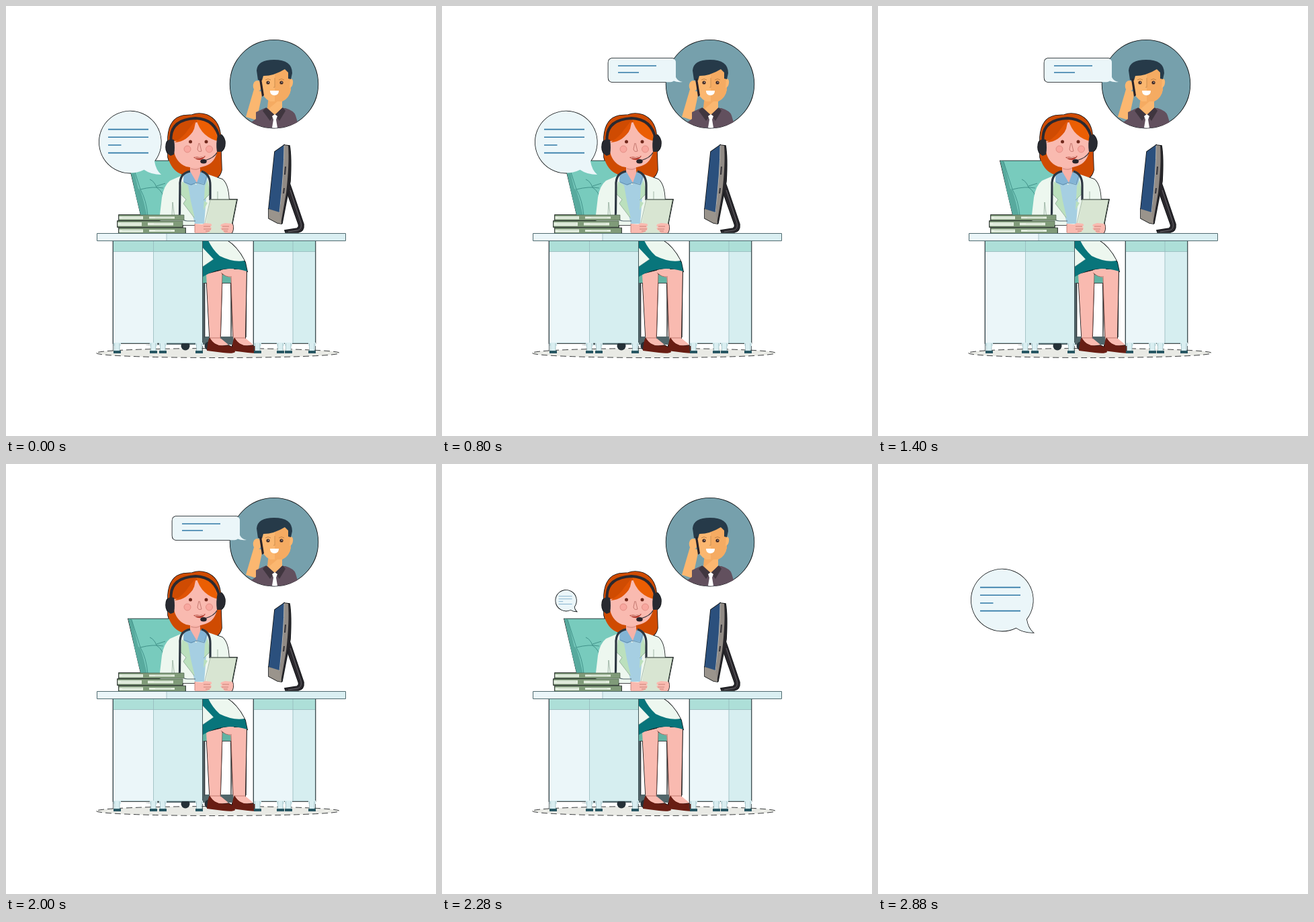
These frames come from a looping animation (640 by 640 pixels, 2.92 s). An HTML page with a canvas:

```html
<!DOCTYPE html>
<html lang="en">
<head>
<meta charset="utf-8">
<title>Support desk</title>
<style>
html, body { margin: 0; width: 100%; height: 100%; overflow: hidden; background: #fff; }
canvas { display: block; width: 100vw; height: 100vh; }
</style>
</head>
<body>
<canvas id="stage" width="640" height="640"></canvas>
<script>
const ctx = document.getElementById('stage').getContext('2d');
const LOOP = 2920, INK = '#0c0f11', ICE = '#ebf6f9', LINE = '#2f78a6';
const parts = [];

// Rimmed shapes get a dark edge that only shows against empty background.
function add(path, fill, rim = false) {
  parts.push({ path: new Path2D(path), fill, rim });
}
function line(path, stroke, width = 1, dash = []) {
  parts.push({ path: new Path2D(path), stroke, width, dash });
}
const box = (x, y, w, h) => `M${x} ${y}h${w}v${h}h${-w}z`;
const oval = (x, y, rx, ry = rx) =>
  `M${x - rx} ${y}a${rx} ${ry} 0 1 0 ${2 * rx} 0a${rx} ${ry} 0 1 0 ${-2 * rx} 0z`;

function buildCaller() {
  const light = '#fbb770', shade = '#f5ab62';
  add(oval(399, 116.3, 65.4), '#76a0ac', true);
  add('M369 124L382 128L373 170L357 165Z', light);
  add('M372 158L385 152H416Q429 156 431 163L434 173Q418 181.7 399 181.7Q380 181.7 365 173L372 168Z', '#62505e');
  add('M391 133H411V151L400 163L389 152Z', shade);
  add('M391 153L411 136V151L400 163Z', light);
  add('M387 151L400 162L393 171L382 156Z', '#40363f');
  add('M412 151L400 162L407 171L416 156Z', '#40363f');
  add('M396 164L400 161L404 164L402 169L404 181Q400 182 396 181L398 169Z', '#fff');
  add('M380 99Q381 92 400 92Q424 93 424 104V124Q422 137 411 142H393Q382 137 380 124Z', light);
  add('M400 94Q424 92 424 106V124Q422 137 411 142H400Z', shade);
  add('M423 108Q428 108 427 115Q426 121 422 122Z', light);
  add('M375 110L373 96Q374 80 399 80Q426 80 426 100L424 109L420 108V99L415 94Q399 104 383 104L381 111Z', '#263a49');
  add(oval(374, 119, 6.3, 8), light);
  add('M377 109L380 108L384 133L381 135Z', '#29242b');
  for (const x of [390, 410]) {
    add(oval(x, 114, 2.6), '#452f2b');
    add(box(x, 113, 1, 1), '#fff');
  }
  line('M386 110Q390 107 394 110M406 110Q410 107 414 110', '#b7793f', .8);
  line('M400 107V121H398', '#c5894d', .8);
  add('M393 126H406Q406 133 399.5 133Q393 133 393 126Z', '#fff');
}

function buildChair() {
  add('M182 230.5H258L272 312H201Z', '#78cbbd', true);
  add('M182 230.5L187 231L207 313H201L193 281Z', '#58aa9e');
  add('M199 273Q204 284 210 313H201L190 268Z', '#58aa9e');
  line('M187 232L200 273Q219 268 234 271M214 258Q221 261 224 270Q234 276 237 292M200 273Q209 289 211 312M224 268L237 264', '#3c8c84', .9);
  add('M293 400H337V412H293Z', '#60b3a3', true);
  add(box(293, 412, 2.5, 91), '#526368', true);
  line('M335 412V492M358 395L357 493', INK, 1.2);
  add('M206 505L238 502H293L296 492H339L343 504H239Z', '#51666a');
  for (const x of [267, 302]) add(oval(x, 506, 6.5), '#253138');
}

function buildLegs() {
  add('M298 399L322 393L319 496L326 505L304 505L303 492Z', '#f9bab0', true);
  add('M334 392H358L356 496L364 505L340 505L338 492Z', '#f9bab0', true);
  add('M320 393L340 389L336 404Q325 403 320 396Z', '#f9bab0');
  line('M320 397Q327 404 336 403M322 398L319 494M335 404L338 494', '#8b5750', .7);
  for (const x of [0, 37]) {
    add(`M${303 + x} 493Q${300 + x} 499 ${299 + x} 513L${323 + x} 516Q${338 + x} 518 ${341 + x} 515Q${341 + x} 509 ${331 + x} 505Q${311 + x} 508 ${303 + x} 493Z`, '#681d13', true);
    add(`M${304 + x} 494Q${316 + x} 495 ${320 + x} 495L${331 + x} 504Q${311 + x} 509 ${304 + x} 494Z`, '#f9bab0');
    line(`M${304 + x} 494H${319 + x}`, '#ad6257', .7);
  }
  add('M293 350H318L356 381L359 395Q323 384 293 403Z', '#08757b', true);
  add('M301 349H329Q344 358 355 379Q338 382 318 372Q307 362 301 349Z', '#edf7ef', true);
  add('M293 360L309 377L293 388Z', '#edf7ef');
  line('M309 377L293 388', '#3c7979', .7);
}

function buildWoman() {
  add('M241 225L241 195Q243 167 264 163L277 162Q287 158 299 162Q316 169 319 190L321 244Q318 258 305 257L260 250Q246 244 241 225Z', '#cf4b02', true);
  add('M274 236H289V252L300 267H264L274 251Z', '#f7b2a8');
  line('M275 242Q284 245 289 241', '#bb7168', .7);
  add('M267 250L244 260Q235 267 232 285L228 319L247 326H322L332 294Q332 266 322 258L299 250L291 263H271Z', '#edf7ef', true);
  add('M264 253L283 266L300 251L299 271L295 324H281L273 290L264 260Z', '#a6cfe2');
  add('M265 249L274 246L284 263L276 267L264 262Z', '#83b4d5');
  add('M290 246L299 252L296 265L284 263Z', '#83b4d5');
  line('M265 262L275 266L284 263L295 266L299 253M284 263V265', '#537f9c', .7);
  add('M262 261L271 267L275 290L281 316L264 294L268 288L260 280Z', '#bbe0bd');
  add('M300 259L304 279L294 290L300 293L294 304L296 268Z', '#bbe0bd');
  line('M260 280L268 288L264 294L280 315M304 279L294 289M248 292L247 312M248 292L251 316M315 276V291', '#819d8b', .7);
  line('M274 246Q258 249 259 267L258.5 311', '#2d3742', 3.2);
  line('M291 246Q304 250 304 267V289', '#2d3742', 3.2);
  line('M259 309Q261 320 270 320Q277 320 282 320', '#53656d', 1.2);
  add('M249 195Q257 176 285 173Q313 178 315 198L314 217Q311 233 297 238Q284 243 268 239Q252 233 249 212Z', '#f9bab0');
  add('M247 211L248 188Q253 169 283 168L278 187Q268 201 250 201Z', '#cf4b02');
  add('M283 168Q311 172 316 201Q305 199 296 191Q287 183 283 168Z', '#eb5e03');
  add('M283 169L280 183Q270 202 251 203Q265 194 271 184Z', '#e05304');
  line('M245.5 205V195Q247 169 282 167Q312 168 318 198', '#2b292f', 4);
  add('M245 198L250 199Q252 211 250 221L245 223Q238 219 238 210Q238 200 245 198Z', '#282a31', true);
  add('M315 192L321 192Q326 197 326 204Q326 214 319 217L314 217Q312 205 315 192Z', '#282a31', true);
  line('M314 218Q310 226 296 230', '#34323a', 1.2);
  add(oval(294, 231.3, 4.7, 3.2), '#27242a');
  for (const x of [270, 302.5]) {
    add(oval(x, 213, 5), '#f8a79f');
    line(oval(x, 213, 5), '#d98178', .7);
  }
  for (const x of [274.5, 298]) add(oval(x, 202, 2.5), '#71281c');
  line('M287 204L285 213Q286 218 291 216L288 204', '#bf7169', .9);
  add('M279 225Q285 224 288 225L297 223Q293 230 287 229Q283 229 279 225Z', '#b73f32');
  line('M281 226Q288 227 295 224', '#fff0e9', .8);
}

function buildTablet() {
  add('M304 287.5L344 288L334 338H295Z', '#d8e5d2', true);
  line('M304 288H343.5L334 337', '#2c3933', 1);
  line('M304 288L295 328', '#91a58e', .7);
  add('M281 324L292 325L296 323L305 324Q308 327 304 328L306 331L304 335L298 338H281Z', '#f9bab0');
  add('M337 324L326 323L320 325Q318 328 322 329L319 331L322 334L326 338H336Q340 331 337 324Z', '#f9bab0', true);
  line('M294 328H304M294 332H305M297 335H303M332 328H322M331 332H321M330 335H324M281 324V337', '#bc7169', .8);
}

function buildBooks() {
  for (const [x, y, w, h] of [[168, 311, 97, 8], [166, 320, 97, 9], [168, 330.5, 99, 8]]) {
    add(box(x, y, w, h), '#e4eee0', true);
    add(box(x, y, w, 2), '#849d7d');
    add(box(x, y + h - 1.5, w, 1.5), '#768f70');
    add(box(x + 36, y, w - 36, h), '#809b79');
    add(box(x + 45, y + 2.5, 38, h - 5), '#e4eee0');
    line(`M${x + 5} ${y + 4}H${x + 34}M${x + 54} ${y + 4}H${x + 78}`, '#c8d8c4', .8);
    line(box(x, y, w, h), '#3d5340', .6);
  }
}

function buildMonitor() {
  add('M421 261L425 272L443 325Q444 335 435 337H416L415 334L433 331Q437 329 435 324L420 282Z', '#29272c', true);
  line('M423 274L439 323Q441 332 434 334L420 336', '#68666a', 1);
  add('M414 207L422 208Q425 225 423 261L411 323L404 320L408 304Z', '#28272b', true);
  add('M414 207L420 208Q422 235 417 278L409 324L404 320L408 304Z', '#918b85');
  add('M400 217L414 207Q414 246 407 308L391 302Z', '#2b507d', true);
  add('M391 302L407 307L410 324L404 323L391 316Z', '#9a948c', true);
  line('M414 208Q414 246 407 308', '#b2b4b4', 1);
  line('M416 239L415 251M414 271L413 279', '#35343a', 2);
}

function buildCabinet(x, split, right, legs) {
  add(box(x, 349, right - x, 153), ICE, true);
  add(box(split, 349, right - split, 153), '#d6eef0');
  add(box(x, 349, right - x, 16.5), '#addfd8');
  line(`M${x} 365.5H${right}M${split} 349V502M${x} 501.5H${right}`, '#96b8bb', .8);
  line(`M${x} 349V513M${right} 349V513`, '#283d42', .8);
  for (const left of legs) {
    add(box(left, 501, 11, 5), '#d9eef1');
    add(box(left + 2, 505, 7, 9), '#d9eef1');
    line(`M${left + 1.5} 502V513M${left + 9} 502V513`, '#8fb1b6', .7);
    add(box(left, 513, 11, 4), '#285763');
  }
}

function buildDesk() {
  buildCabinet(159.5, 219.5, 292.5, [160, 214, 228, 282]);
  buildCabinet(368.5, 427, 460.5, [369, 403, 415, 450]);
  add(box(136, 339, 369.5, 10), '#daeff2');
  add(box(136, 339, 103, 10), ICE);
  line('M239 339V349', '#9cb9be', .8);
  line(box(135.5, 338.5, 370, 11), '#506b70', 1);
}

function buildScene() {
  const floor = oval(315.5, 516.5, 181, 7);
  add(floor, '#e9eae5');
  line(floor, INK, .8, [9, 5]);
  buildChair();
  buildLegs();
  buildWoman();
  buildTablet();
  buildBooks();
  buildMonitor();
  buildDesk();
  buildCaller();
}

const roundBubble = {
  x: 184.5, y: 203.5,
  body: new Path2D('M221 231A46 46 0 1 0 205.5 243.7Q216 251 231 251Q223 244 221 231Z'),
  text: new Path2D('M152 183.6H212M152 195.3H212M152 207H171.5M152 218.6H212')
};
const wideBubble = {
  x: 302.5, y: 95.5,
  body: new Path2D('M254.5 77.7H341Q348 77.7 348 84.5V106Q351 112 358 113Q350 114 345 111.5Q343 113.2 340 113.2H254.5Q247.5 113.2 247.5 106.5V84.5Q247.5 77.7 254.5 77.7Z'),
  text: new Path2D('M262 89H319M262 99H293')
};

function drawBubble(bubble, scale, rimOnly) {
  if (scale <= 0) return;
  ctx.save();
  ctx.translate(bubble.x, bubble.y);
  ctx.scale(scale, scale);
  ctx.translate(-bubble.x, -bubble.y);
  if (rimOnly) {
    ctx.strokeStyle = INK;
    ctx.lineWidth = 1.6 / scale;
    ctx.stroke(bubble.body);
  } else {
    ctx.fillStyle = ICE;
    ctx.fill(bubble.body);
    ctx.strokeStyle = LINE;
    ctx.lineWidth = 1.6;
    ctx.stroke(bubble.text);
  }
  ctx.restore();
}

function drawRims() {
  ctx.strokeStyle = INK;
  ctx.lineWidth = 1.6;
  for (const part of parts) if (part.rim) ctx.stroke(part.path);
}

function drawParts() {
  for (const part of parts) {
    if (part.fill) {
      ctx.fillStyle = part.fill;
      ctx.fill(part.path);
    } else {
      ctx.strokeStyle = part.stroke;
      ctx.lineWidth = part.width;
      ctx.setLineDash(part.dash);
      ctx.stroke(part.path);
    }
  }
  ctx.setLineDash([]);
}

const ramp = (t, from, to) => Math.min(1, Math.max(0, (t - from) / (to - from)));

function render(now) {
  const t = Math.floor((now % LOOP) / 40) * 40;
  const roundScale = t < 2000 ? 1 - ramp(t, 1160, 1400) : ramp(t, 2200, 2440);
  const wideScale = ramp(t, 520, 800) - ramp(t, 2000, 2240);
  const sceneVisible = t < 2880;

  ctx.fillStyle = '#fff';
  ctx.fillRect(0, 0, 640, 640);
  drawBubble(roundBubble, roundScale, true);
  drawBubble(wideBubble, wideScale, true);
  if (sceneVisible) {
    drawRims();
    drawParts();
  }
  drawBubble(roundBubble, roundScale, false);
  drawBubble(wideBubble, wideScale, false);
}

buildScene();
const start = performance.now();
function tick() {
  render(performance.now() - start);
  requestAnimationFrame(tick);
}
tick();
</script>
</body>
</html>
```
